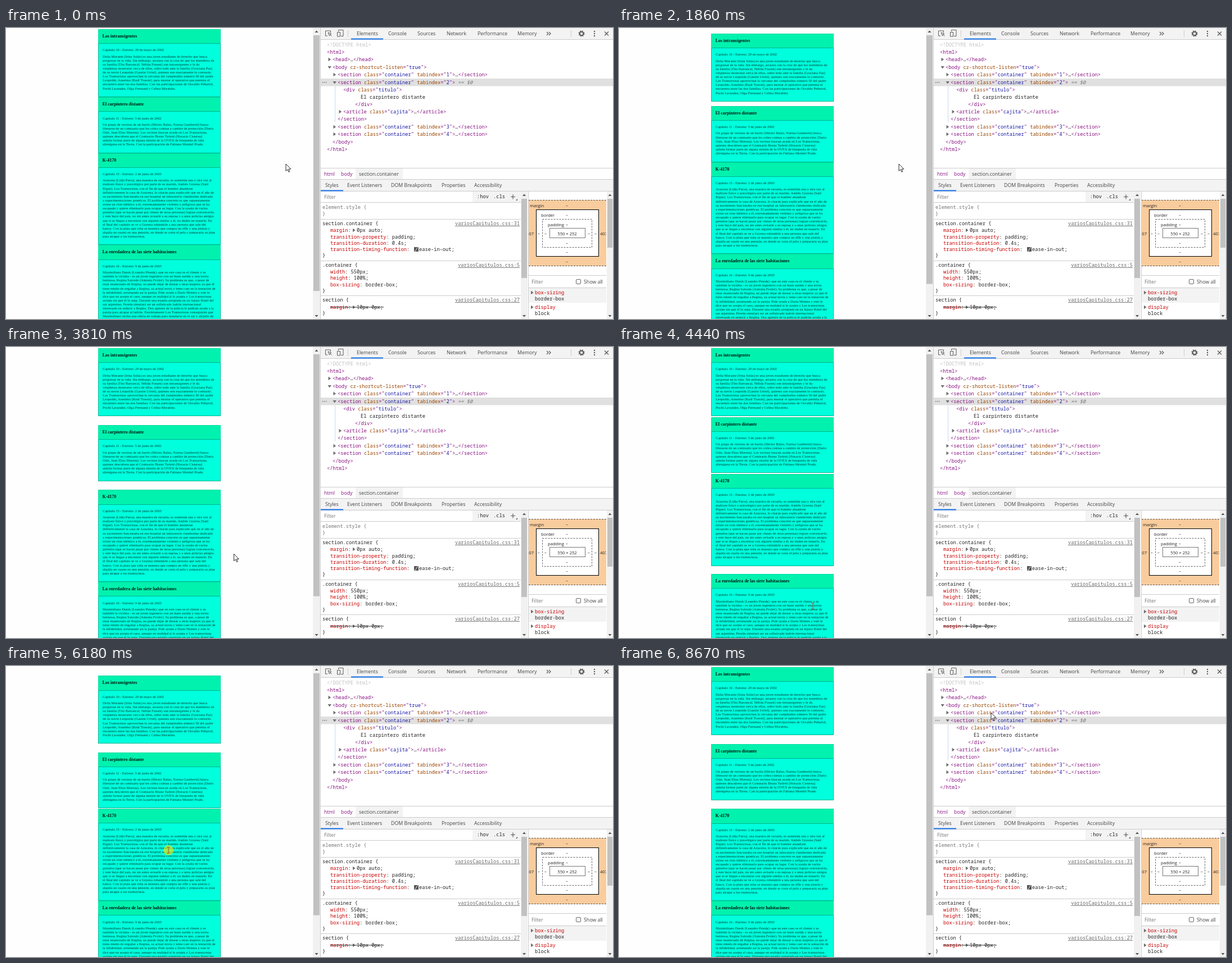
Write an HTML page that moves like this. It is 1080x518 px and loops after 8760 ms.

```html
<!DOCTYPE html>
<html lang="es">
<head>
<meta charset="utf-8">
<style>
html, body { margin: 0; width: 100%; height: 100%; overflow: hidden; background: #fefefe; }
#page { position: absolute; left: 164px; top: 0; width: 218px; height: 100%; padding-top: 2px; box-sizing: border-box; overflow: hidden; font: 6.34px/7.13px "Liberation Serif", serif; color: #003a35; white-space: pre; }
h2, article { margin: 0; box-sizing: border-box; border: 1px solid #00b48c; }
h2 { height: 25.3px; padding-left: 6.5px; font-size: 7.92px; line-height: 23.5px; color: #001a12; background: #00f2ae; border-color: #00dc9e; border-bottom: 0; }
article { padding: 7.2px 7px 11.3px; background: #00ffdd; }
article p { margin: 0 0 4px; }
section:last-child article { height: 150px; }
#ui { position: absolute; left: 0; top: 0; }
text { font: 8.72px "Noto Sans Mono", monospace; white-space: pre; fill: #222; }
.sans { font: 8.8px "Open Sans", sans-serif; fill: #444; }
.small { font: 7.6px "Open Sans", sans-serif; }
.tag { fill: #881280; }
.name { fill: #994500; }
.value { fill: #1a1aa6; }
.prop { fill: #c80000; }
.grey { fill: #777; }
.faint { fill: #c0c0c0; }
.hint { fill: #757575; }
.italic { font-style: italic; }
.link { fill: #666; text-decoration: underline; text-anchor: end; }
.mid { text-anchor: middle; }
</style>
</head>
<body>
<div id="page"></div>
<svg id="ui" width="1080" height="518" viewBox="0 0 1080 518"></svg>
<script>
const episodes = [
  ['Los intransigentes', 'Capítulo 10 - Estreno: 29 de mayo de 2002',
`Delia Morante (Irina Solás) es una joven estudiante de derecho que busca
progresar en la vida. Sin embargo, arrastra con la cruz de que los miembros de
su familia (Tito Barrancal, Nélida Fossen) son intransigentes y le da
vergüenza mostrarse cerca de ellos, sobre todo ante la familia (Graciana Paz)
de su novio Leopoldo (Gastón Urriel), quienes son exactamente lo contrario.
Los Tramoyistas aprovechan la cercanía del cumpleaños número 50 del padre
Leopoldo, Anselmo (Raúl Tissoni), para montar el operativo que permita el
encuentro entre las dos familias. Con las participaciones de Osvaldo Peñarrol,
Pochi Lavandez, Olga Fermand y Celina Morabito.`],
  ['El carpintero distante', 'Capítulo 11 - Estreno: 5 de junio de 2002',
`Un grupo de vecinos de un barrio (Héctor Balzo, Norma Gambertti) busca
liberarse de un comisario que les cobra coimas a cambio de protección (Darío
Osle, Juan Elías Morena). Los vecinos buscan ayuda en Los Tramoyistas,
quienes descubren que el Comisario Bruno Tarletti (Horacio Cisterna)
anhela formar parte de alguna misión de la OVEX de búsqueda de vida
alienígena en la Tierra. Con la participación de Fabiana Montiel Prado.`],
  ['K-4170', 'Capítulo 15 - Estreno: 2 de junio de 2003',
`Azucena (Lidia Parra), una maestra de escuela, es sometida una y otra vez al
maltrato físico y psicológico por parte de su marido, Andrés Goyena (Saúl
Rigue). Los Tramoyistas, con el fin de que el hombre abandone
definitivamente la casa de Azucena, lo citarán para explicarle que en el año de
su nacimiento funcionaba en ese hospital un laboratorio clandestino dedicado
a experimentaciones genéticas. El problema concreto es que supuestamente
existe un clon idéntico a él, extremadamente violento y peligroso que se ha
escapado y quiere eliminarlo para ocupar su lugar. Con la ayuda de varios
gemelos (que se hacen pasar por clones de otras personas) logran convencerlo,
y este huye del país, no sin antes avisarle a su esposa y a unos policías amigos
que si se llegan a encontrar con alguien similar a él, no duden en matarlo. En
el final del capítulo se ve a Goyena robándole a una persona que sale del
banco. Con la plata que roba se muestra que compra un rifle y una pistola y
alquila un cuarto en una pensión, en donde se corta el pelo y prepararía su plan
para atrapar a los tramoyistas.`],
  ['La enredadera de las siete habitaciones', 'Capítulo 16 - Estreno: 9 de junio de 2003',
`Maximiliano Durek (Leandro Pineda) -que en este caso es el cliente y es
también la víctima - es un joven ingeniero con un buen sueldo y una novia
hermosa, Regina Salcedo (Antonia Fexler). Su problema es que, a pesar de
estar enamorado de Regina, no puede dejar de desear a otras mujeres ya que él
tiene miedo de engañar a Regina, su actual novia y teme caer en la tentación de
la infidelidad, arruinando así la pareja. Pide ayuda a Darío Montes y este le
dice que no acepta el caso, aunque en realidad si lo acepta y Los tramoyistas
actúan sin que él lo sepa. Durante una estadía arreglada en un lujoso Hotel del
sur argentino, Pereda simulará ser un sofisticado ladrón internacional
interesado en seducir a Regina. Dos agentes de la policía le pedirán ayuda a la
pareja para atrapar al ladrón. Paralelamente Los Tramoyistas conseguirán que
Maximiliano reciba una oferta de trabajo para instalarse en el sur y alejarlo de`]
];
const $ = id => document.getElementById(id);
$('page').innerHTML = episodes.map(([title, date, body]) =>
  `<section><h2>${title}</h2><article><p>${date}</p>${body}</article></section>`).join('');

// Drawing helpers for the browser and inspector chrome
const text = (x, y, str, cls = '') => `<text x="${x}" y="${y + 3}" class="${cls}">${str}</text>`;
const rect = (x, y, w, h, fill, extra = '') => `<rect x="${x}" y="${y}" width="${w}" height="${h}" fill="${fill}" ${extra}/>`;
const frame = (x, y, w, h, stroke, extra = '') => rect(x + .5, y + .5, w - 1, h - 1, '#fff', `stroke="${stroke}" ${extra}`);
const path = (d, extra = '') => `<path d="${d}" fill="none" stroke="#5a5a5a" ${extra}/>`;
const line = (x, y, w) => rect(x, y, w, 1, '#ccc');
const closed = (x, y) => `<path d="M${x - 2} ${y - 3.2}l4.6 3.2-4.6 3.2z" fill="#6e6e6e"/>`;
const opened = (x, y) => `<path d="M${x - 3} ${y - 2}h6.4l-3.2 4.6z" fill="#6e6e6e"/>`;
const markup = s => s.replace(/</g, '&lt;')
  .replace(/ ([\w-]+)="([^"]*)"/g, ' <tspan class="name">$1</tspan>="<tspan class="value">$2</tspan>"')
  .replace('…', '<tspan fill="#222">…</tspan>');
const tag = (x, y, s, arrow) => text(x, y, markup(s), 'tag') + (arrow ? arrow(x - 5.5, y) : '');
const decl = (y, name, value) => text(577, y, `<tspan class="prop">${name}</tspan>: ${value}`);
const sourceLink = (y, n) => text(914, y, 'variosCapitulos.css:' + n, 'link');
const scrollbar = (x, top, w, thumb, id = '') => rect(x, top, w, 518 - top, '#f1f1f1') +
  rect(x + 1, top + 13, w - 2, thumb, '#c1c1c1', id) +
  `<path d="M${x + w / 2 - 3} ${top + 8}h6l-3-3.5zM${x + w / 2 - 3} 511h6l-3 3.5z" fill="#555"/>`;
const section = n => `<section class="container" tabindex="${n}">…</section>`;
const tabs = (y, list) => list.map(([x, s]) => text(x, y, s, 'sans')).join('');

const toolbar = rect(560, 0, 520, 20, '#f3f3f3') + line(560, 20, 520) + rect(614, 18.5, 57, 2, '#1a73e8') +
  path('M572 14h-3.5v-9h9v3.5M573 8l6 2.5-2.5 1-1 2.5zM576.5 11.5l3 3') +
  path('M591.5 6v-2.5h8.5v11h-4M589.5 7.5h5v7.5h-5z') +
  rect(608, 4, 1, 12, '#ccc') + rect(1005, 4, 1, 12, '#ccc') +
  tabs(10, [[624, 'Elements'], [680, 'Console'], [732, 'Sources'], [784, 'Network'], [839, 'Performance'], [910, 'Memory']]) +
  path('M962 7l3 3-3 3M966 7l3 3-3 3', 'stroke-width="1.2"') +
  '<circle cx="1024" cy="10" r="3.3" fill="none" stroke="#5a5a5a" stroke-width="2"/>' +
  '<circle cx="1024" cy="10" r="4.8" fill="none" stroke="#5a5a5a" stroke-width="1.5" stroke-dasharray="1.9"/>' +
  [6, 10, 14].map(y => `<circle cx="1047" cy="${y}" r="1.2" fill="#5a5a5a"/>`).join('') +
  path('M1065 6.5l7 7m0-7l-7 7', 'stroke-width="1.3"');

const elements = rect(560, 90, 520, 13.5, '#e0e0e0') + rect(585, 104, 1, 64, '#c9d7ee') +
  text(571, 29.5, '&lt;!DOCTYPE html>', 'faint') + tag(571, 43, '<html>') +
  tag(581, 56, '<head>…</head>', closed) + tag(581, 70, '<body cz-shortcut-listen="true">', opened) +
  tag(590, 83, section(1), closed) + tag(590, 97, section(2).split('…')[0], opened) +
  [563, 566, 569].map(x => rect(x, 96, 1.5, 1.5, '#777')).join('') +
  text(804, 97, '== $0', 'grey italic') +
  tag(600, 110, '<div class="titulo">') + text(631, 123, 'El carpintero distante') + tag(621, 135.5, '</div>') +
  tag(600, 149, '<article class="cajita">…</article>', closed) + tag(590, 162, '</section>') +
  tag(590, 176, section(3), closed) + tag(590, 189, section(4), closed) +
  tag(581, 203, '</body>') + tag(571, 216, '</html>') +
  line(560, 249, 520) + rect(622, 250, 84, 19, '#f3f3f3') +
  text(566, 260, 'html', 'sans tag') + text(596, 260, 'body', 'sans tag') + text(628, 260, 'section.container', 'sans');

const styles = rect(560, 269, 520, 21, '#f3f3f3') + line(560, 269, 520) + line(560, 290, 520) +
  rect(560, 288.5, 40, 2, '#1a73e8') +
  tabs(280, [[568, 'Styles'], [607, 'Event Listeners'], [685, 'DOM Breakpoints'], [775, 'Properties'], [833, 'Accessibility']]) +
  rect(830, 291, 86, 19, '#f3f3f3') + line(560, 310, 356) + text(566, 301, 'Filter', 'sans hint') +
  text(838, 300, ':hov') + text(867, 300, '.cls') + path('M898 300.5h8m-4-4v8', 'stroke-width="1.2"') +
  '<path d="M907 307h3v-3z" fill="#5a5a5a"/>' +
  text(563, 319, 'element.style {', 'grey') + text(563, 331, '}', 'grey') + line(560, 340, 356) +
  text(563, 348, 'section.container {') + sourceLink(348, 31) +
  decl(360, 'margin', '') + closed(619, 360) + text(624, 360, '0px auto;') +
  decl(372, 'transition-property', 'padding;') + decl(383, 'transition-duration', '0.4s;') +
  decl(394, 'transition-timing-function', '') + rect(726, 390, 8, 8, '#555') +
  path('M727 397c4 0 2-5 6-6', 'style="stroke:#fff"') + text(735, 394, 'ease-in-out;') +
  text(563, 405, '}') + line(560, 414, 356) +
  text(563, 422, '.container {') + sourceLink(422, 5) +
  decl(434, 'width', '550px;') + decl(445, 'height', '100%;') + decl(457, 'box-sizing', 'border-box;') +
  text(563, 468, '}') + line(560, 476, 356) +
  text(563, 484, 'section {') + sourceLink(484, 27) +
  decl(497, 'margin', '') + closed(619, 497) + text(624, 497, '10px 0px;') + rect(577, 496.5, 95, 1, '#333') +
  text(563, 508, '}') + scrollbar(916, 291, 12, 141) + rect(929, 290, 1, 228, '#ccc');

const dash = (x, y) => text(x, y, '–', 'small mid');
const boxModel = rect(930, 306, 138, 118, '#f9cc9d') +
  path('M930 306.5h138M930 423.5h138', 'stroke-dasharray="3 2"') +
  frame(943, 323, 112, 84, '#000') + frame(954, 340, 89, 51, '#666', 'stroke-dasharray="3 2"') + frame(967, 356, 64, 18, '#777') +
  text(932, 316, 'margin', 'small') + text(952, 332.5, 'border', 'small') + text(964, 349.5, 'padding', 'small') +
  [315, 332, 349, 382, 398, 415].map(y => dash(998, y)).join('') +
  [948, 960, 1037, 1049].map(x => dash(x, 365)).join('') +
  text(998.5, 365.5, '550 × 252', 'small mid') +
  `<svg x="930" y="358" width="138" height="15" viewBox="930 358 138 15">${text(926, 365.5, '407', 'small') + text(1057, 365.5, '407', 'small')}</svg>` +
  line(930, 440, 138) + text(935, 452, 'Filter', 'sans hint') +
  frame(1014, 447, 9, 9, '#666', 'rx="1.5"') + text(1028, 452, 'Show all', 'sans') + line(930, 462, 138) +
  rect(930, 463, 138, 26, '#f3f3f3') +
  closed(936, 471) + text(941, 471, 'box-sizing', 'prop') + text(941, 482, 'border-box') +
  closed(936, 497) + text(941, 497, 'display', 'prop') + text(941, 508, 'block') + scrollbar(1069, 291, 11, 87);

const cursor = `<g id="cursor"><circle id="halo" r="9" fill="#ffec00" fill-opacity=".6"/>
  <path id="arrow" d="M0 0V12.5L2.9 9.8 4.9 14.3 6.8 13.5 4.8 9.1H8.8Z" fill="#fff" stroke="#111" stroke-width=".9"/>
  <path id="beam" d="M-2.5-5.5h2l.5.5.5-.5h2M0-5V5M-2.5 5.5h2l.5-.5.5.5h2" fill="none" stroke="#a8452c"/></g>`;

$('ui').innerHTML = scrollbar(546, 0, 13, 400, 'id="thumb"') + rect(559, 0, 521, 518, '#fff') + rect(559, 0, 1, 518, '#ccc') +
  toolbar + elements + styles + boxModel + cursor;

const LOOP = 8760, PAD = 15.86;
const ticks = [[0, 1], [1170, 1], [1250, 1], [1710, 2], [1860, 3], [2090, 1], [2800, 4], [3100, 1], [3570, 11],
  [4440, 1], [4520, 11], [5390, 1], [5470, 7], [6030, 1], [6180, 5], [6570, 1], [6730, 6], [7170, 1],
  [7320, 1], [7430, 1], [7490, 3], [7720, 1], [8360, 4], [8670, 1], [LOOP, 1]];
// [time, section that gains focus, by mouse]
const focuses = [[1140, -1, true], [1660, 0], [2705, 1], [4130, 3, true], [5170, 0, true], [6130, 2, true], [7340, 1, true]];
// [start, end, bend x, bend y, x, y]
const moves = [[3530, 4060, 400, 370, 345, 461], [4460, 5110, 425, 270, 340, 85], [5560, 6030, 325, 200, 289, 328],
  [6680, 7170, 305, 260, 308, 189], [8310, 8670, 480, 160, 662, 83]];

const sections = [...$('page').children];
const clamp = v => Math.min(1, Math.max(0, v));
const smooth = u => u * u * (3 - 2 * u);
const show = (id, visible) => $(id).style.display = visible ? '' : 'none';

// cubic-bezier(.42, 0, .58, 1)
function easeInOut(x) {
  let lo = 0, hi = 1;
  for (let i = 0; i < 18; i++) {
    const s = (lo + hi) / 2, r = 1 - s;
    if (1.26 * r * r * s + 1.74 * r * s * s + s ** 3 < x) lo = s; else hi = s;
  }
  return smooth(hi);
}

function snap(t) {
  const i = ticks.findIndex(([start]) => start > t) - 1;
  const [start, steps] = ticks[i], step = (ticks[i + 1][0] - start) / steps;
  return start + Math.floor((t - start) / step) * step;
}

function draw(now) {
  const t = snap(now % LOOP);

  let pads = [0, 0, 0, 0];
  for (const [start, index] of focuses) {
    if (t < start || index < 0) continue;
    const e = easeInOut(clamp((t - start) / 400));
    pads = pads.map((p, i) => p + ((i === index) - p) * e);
  }
  sections.forEach((el, i) => el.style.padding = `${pads[i] * PAD}px 0`);
  const contentHeight = 560 + 2 * PAD * pads.reduce((a, b) => a + b);
  $('thumb').setAttribute('height', 492 * 518 / contentHeight);

  let x = 498, y = 242;
  for (const [start, end, bx, by, ex, ey] of moves) {
    const u = smooth(clamp((t - start) / (end - start))), r = 1 - u;
    x = r * r * x + 2 * r * u * bx + u * u * ex;
    y = r * r * y + 2 * r * u * by + u * u * ey;
  }
  $('cursor').setAttribute('transform', `translate(${x} ${y})`);
  const overText = x > 164 && x < 382;
  show('arrow', !overText);
  show('beam', overText);
  show('halo', focuses.some(([start, , mouse]) => mouse && t >= start - 20 && t < start + 100));
}

const begin = performance.now();
(function loop() {
  draw(performance.now() - begin);
  requestAnimationFrame(loop);
})();
</script>
</body>
</html>
```
